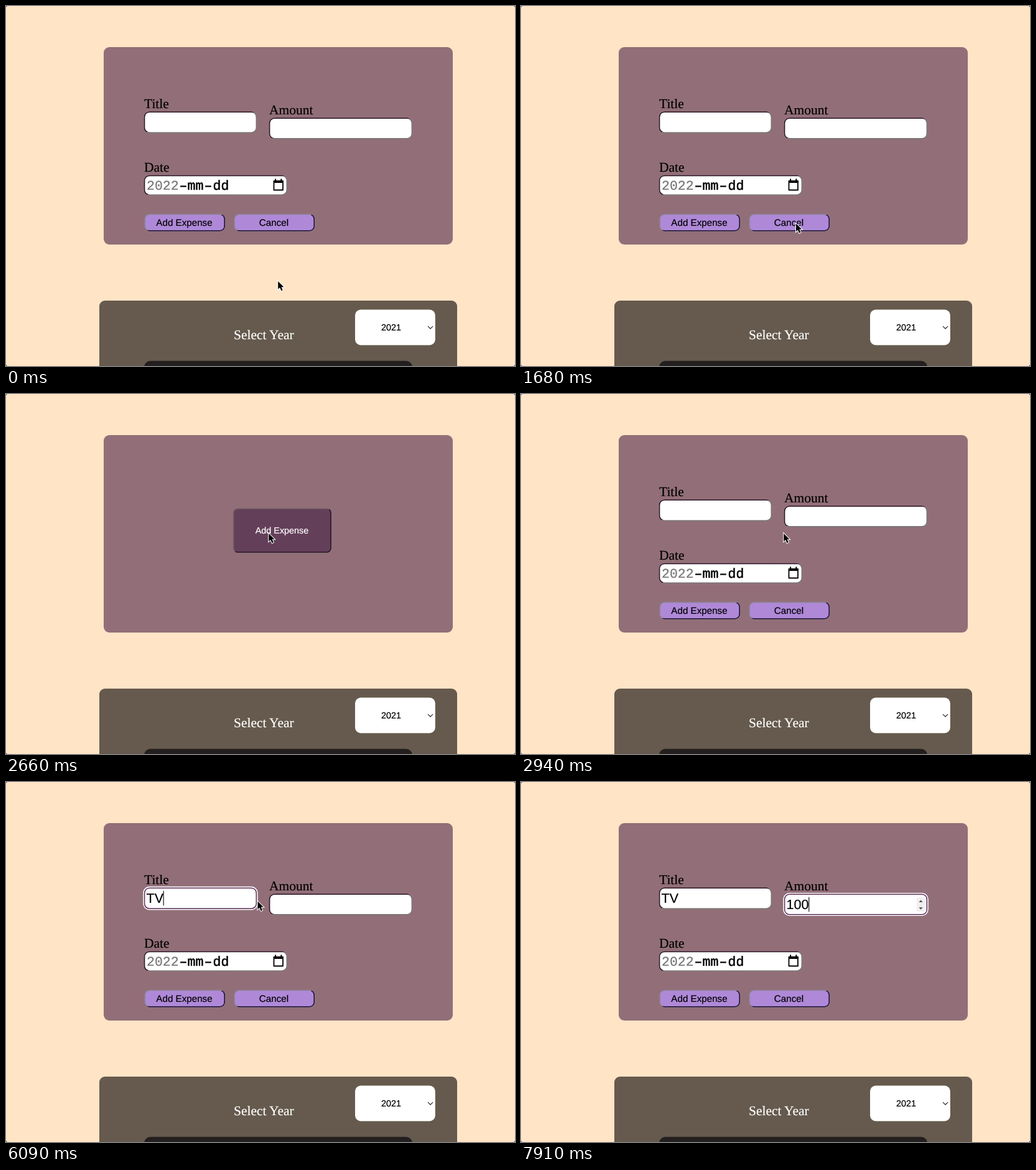
An HTML page that plays this animation: 818x578 px, repeating every 8 s.

```html
<!DOCTYPE html>
<html lang="en">
<head>
<meta charset="utf-8">
<title>Expense form</title>
<style>
html, body { margin: 0; width: 100%; height: 100%; overflow: hidden; background: #ffe4c6; }
svg { position: absolute; left: 0; top: 0; width: 100%; height: 100%; }
text { fill: currentColor; stroke: currentColor; stroke-width: .2px; text-rendering: geometricPrecision; }
.white { color: #fff; }
.field { fill: #fff; stroke: url(#inset); stroke-width: 1.5px; }
.field.focus { stroke: #5c2c56; }
.button { fill: #af89d8; stroke: url(#outset); stroke-width: 1.6px; }
#select { fill: #fff; }
#select.focus { stroke: #6f3d66; stroke-width: 1.4px; }
.ring { fill: #fff; }
.serif { font: 21.5px "Liberation Serif", Times, serif; }
.sans { font: 15.2px "Liberation Sans", Arial, sans-serif; }
.small { font-size: 14.4px; }
.big { font-size: 21.5px; }
.mono { font: 21.5px "Liberation Mono", Courier, monospace; }
.strong text { stroke-width: .5px; }
</style>
</head>
<body>
<svg viewBox="0 0 818 578">
  <defs>
    <linearGradient id="inset" x2="1" y2="1">
      <stop offset=".5" stop-color="#2a1426"/><stop offset=".5" stop-color="#767676"/>
    </linearGradient>
    <linearGradient id="outset" x2="1" y2="1">
      <stop offset=".5" stop-color="#8c8497"/><stop offset=".5" stop-color="#1c1440"/>
    </linearGradient>
    <linearGradient id="outsetDark" x2="1" y2="1">
      <stop offset=".5" stop-color="#705a62"/><stop offset=".5" stop-color="#241628"/>
    </linearGradient>
  </defs>

  <rect x="157" y="66" width="561" height="317" rx="9" fill="#926f78"/>
  <rect x="150" y="473" width="575" height="140" rx="9" fill="#655a4d"/>
  <rect x="222" y="569.7" width="431" height="40" rx="10" fill="#231f1f"/>
  <text class="serif white" x="366" y="535">Select Year</text>
  <rect id="selectRing" class="ring" x="559.2" y="485.7" width="132.4" height="60.6" rx="10"/>
  <rect id="select" x="561" y="487.5" width="128.8" height="57" rx="9"/>
  <text class="sans small" x="603" y="521">2021</text>
  <path d="M678 514.2l4 4 4-4" fill="none" stroke="#222" stroke-width="1.2"/>

  <g id="form">
    <rect id="titleRing" class="ring" x="220.3" y="167.8" width="184.3" height="37.6" rx="10"/>
    <rect id="amountRing" class="ring" x="421.3" y="178" width="233.3" height="37" rx="10"/>
    <rect id="title" class="field" x="222.6" y="170.2" width="179.7" height="33" rx="8"/>
    <rect id="amount" class="field" x="423.6" y="180.2" width="228.7" height="32.6" rx="8"/>
    <rect class="field" x="222.6" y="272.4" width="228.7" height="30.8" rx="8"/>
    <rect class="button" x="223.2" y="334.5" width="128" height="26.2" rx="7.5"/>
    <rect class="button" x="367.2" y="334.5" width="128" height="26.2" rx="7.5"/>
    <g class="serif">
      <text x="222" y="164">Title</text>
      <text x="423" y="174">Amount</text>
      <text x="222" y="266">Date</text>
    </g>
    <g class="sans" text-anchor="middle">
      <text x="286.5" y="352.5">Add Expense</text>
      <text x="430.5" y="352.5">Cancel</text>
    </g>
    <g class="mono">
      <text x="226" y="295" color="#757575">2022</text>
      <g class="strong">
        <text x="278.5" y="295">–</text><text x="291.5" y="295">mm</text>
        <text x="318.5" y="295">–</text><text x="332.5" y="295">dd</text>
      </g>
    </g>
    <path d="M430.5 281h14.5v14.5h-14.5z" fill="none" stroke="#000" stroke-width="1.8" stroke-linejoin="round"/>
    <path d="M430 280h15.5v4h-15.5zM432 277.5h2.2v3h-2.2zM441.3 277.5h2.2v3h-2.2z"/>
    <g id="spinner">
      <rect x="636" y="185.5" width="13" height="22.5" rx="2" fill="#efefef"/>
      <path d="M639.5 193l3-3.6 3 3.6zM639.5 201.2l3 3.6 3-3.6z" fill="#505050"/>
    </g>
    <g class="sans">
      <text id="titleText" class="big" x="225.6" y="194"></text>
      <text id="amountText" class="big" x="426.6" y="204"></text>
    </g>
    <rect id="caret" width="1.1" height="23.5"/>
  </g>

  <g id="open">
    <rect x="365.8" y="184.2" width="156.2" height="69.8" rx="6.5" fill="#643f5a" stroke="url(#outsetDark)" stroke-width="1.6"/>
    <text class="sans small white" x="443.5" y="224" text-anchor="middle">Add Expense</text>
  </g>

  <path d="M0 0h2l-2 2zM818 0v2l-2-2zM0 578v-2l2 2zM818 578h-2l2-2z" fill="#5d5360"/>
  <path id="arrow" d="M0 0v12.8l2.9-2.7 2.3 5.2 2.3-1-2.2-5.1h3.9z" stroke="#fff" stroke-width="2" paint-order="stroke"/>
  <g id="beam" fill="none" stroke-linecap="round">
    <g stroke="#fff" stroke-width="3"><use href="#beamShape"/></g>
    <g stroke="#000" stroke-width="1.3">
      <path id="beamShape" d="M-3-7.5q3 0 3 2.4v10.2q0 2.4-3 2.4M3-7.5q-3 0-3 2.4v10.2q0 2.4 3 2.4M-1.7 3h3.4"/>
    </g>
  </g>
</svg>

<script>
const LOOP = 8000, STEP = 70;
const $ = id => document.getElementById(id);
const show = (id, on) => $(id).style.display = on ? "" : "none";
const within = (v, a, b) => v >= a && v < b;

// pointer way points: time, x, y
const path = [
  [0, 437.2, 442], [560, 442, 349.3], [2100, 442, 349.3], [2450, 418, 244], [2660, 422.3, 224],
  [3220, 422.3, 224], [3640, 352, 203.3], [6020, 352, 203.3], [6090, 404.5, 191.6],
  [6300, 450, 174], [6580, 557, 199], [LOOP, 557, 199]
];

function pointer(t) {
  const i = path.findIndex(p => p[0] > t), a = path[i - 1], b = path[i];
  const k = (t - a[0]) / (b[0] - a[0]), e = k * k * (3 - 2 * k);
  return [a[1] + (b[1] - a[1]) * e, a[2] + (b[2] - a[2]) * e];
}

function focus(id, on) {
  $(id).classList.toggle("focus", on);
  show(id + "Ring", on);
}

function draw(t) {
  const formOpen = !within(t, 1750, 2940);
  show("form", formOpen);
  show("open", !formOpen);

  const onTitle = within(t, 3850, 6860), onAmount = t >= 6860;
  focus("select", within(t, 910, 1680));
  focus("title", onTitle);
  focus("amount", onAmount);

  const title = "TV".slice(0, (t >= 5390) + (t >= 5670));
  const amount = "100".slice(0, (t >= 7560) + (t >= 7770) + (t >= 7910));
  $("titleText").textContent = title;
  $("amountText").textContent = amount;

  const blinkOff = within(t, 4410, 4900) || within(t, 6160, 6720) || within(t, 7420, 7560);
  $("caret").setAttribute("x", onAmount ? 426.2 + 12 * amount.length : 225.2 + 13.7 * title.length);
  $("caret").setAttribute("y", onAmount ? 184.8 : 174.8);
  show("caret", (onTitle || onAmount) && !blinkOff);

  const [x, y] = pointer(t);
  const overTitle = within(x, 223, 402) && within(y, 170, 204);
  const overAmount = within(x, 424, 652) && within(y, 180, 213);
  const overLabel = within(x, 424, 494) && within(y, 160, 180);
  const hidden = within(t, 5390, 6090) || t >= 7560;
  const overText = formOpen && (overTitle || overAmount || overLabel);
  show("spinner", overAmount);
  show("arrow", !hidden && !overText);
  show("beam", !hidden && overText);
  for (const id of ["arrow", "beam"]) $(id).setAttribute("transform", `translate(${x} ${y})`);
}

const start = performance.now();
function tick() {
  const t = (performance.now() - start) % LOOP;
  draw(Math.floor(t / STEP) * STEP);
  requestAnimationFrame(tick);
}
tick();
</script>
</body>
</html>
```
